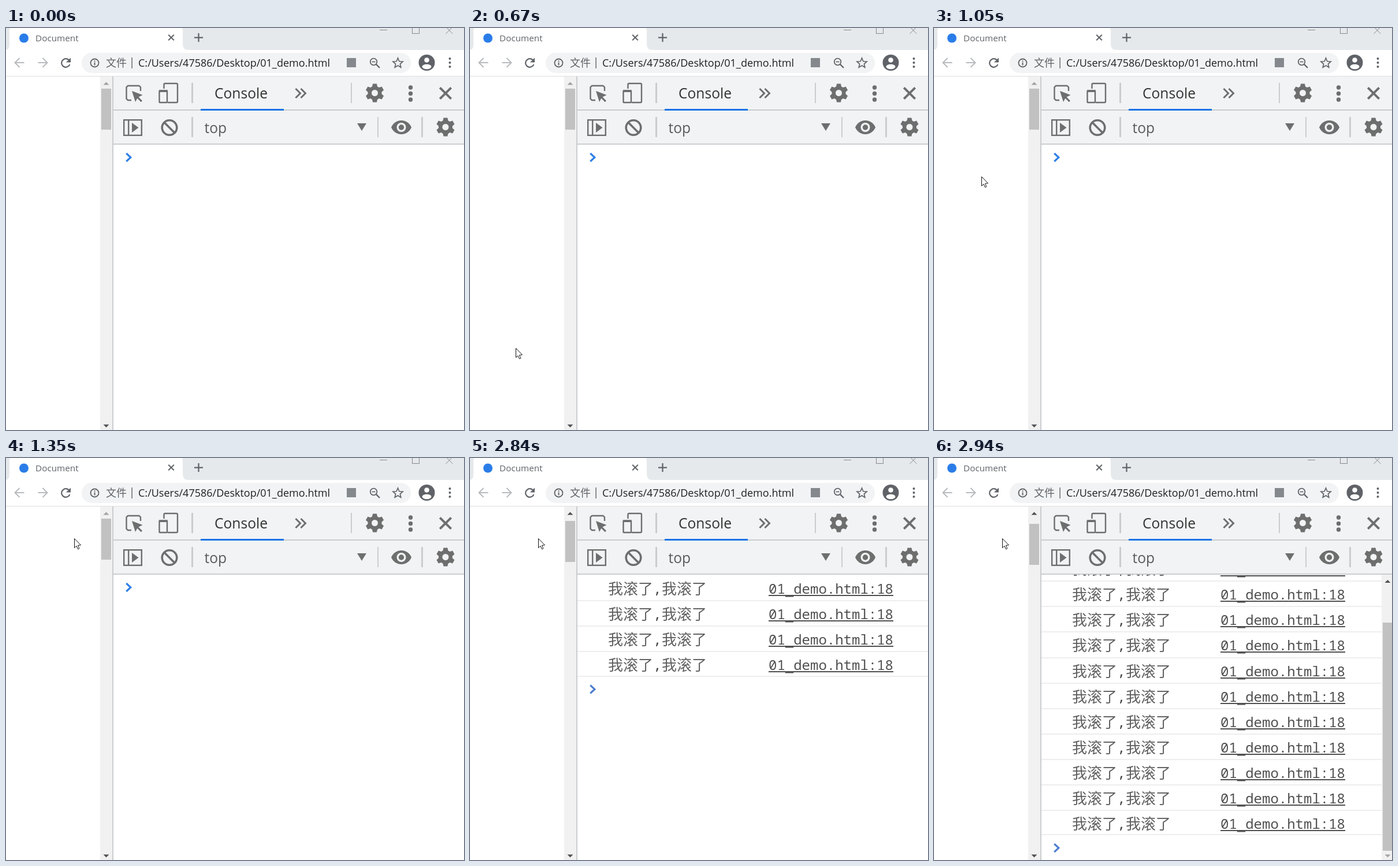
Write an HTML page with a canvas that moves like this. It is 793 px wide and 696 px high and loops after 7550 ms.

```html
<!DOCTYPE html>
<html lang="zh">
<head>
<meta charset="utf-8">
<title>Document</title>
<style>
html, body { margin: 0; width: 100%; height: 100%; overflow: hidden; background: #fff; }
canvas { display: block; }
</style>
</head>
<body>
<canvas id="stage" width="793" height="696"></canvas>
<script>
const ctx = document.getElementById('stage').getContext('2d');
const LOOP = 7550;
const UI = '"Open Sans", "Noto Sans", sans-serif';
const CJK = '"Noto Sans CJK SC", "Noto Sans CJK", sans-serif';
const MONO = '"Noto Sans Mono", "DejaVu Sans Mono", monospace';
const GREY = '#5f6368', ICON = '#6e6e6e', LINE = '#cacdd1', BAR = '#f1f3f4';
const ROW = 44.1, CHAR = 14.4;

// Pointer tip: time, x, y
const PATH = [
  [450, 192, 684], [560, 118, 620], [675, 79, 554], [800, 75, 445],
  [950, 76, 325], [1050, 82, 257], [1200, 105, 180], [1350, 118, 139]
];

function rect(x, y, w, h, color) {
  ctx.fillStyle = color;
  ctx.fillRect(x, y, w, h);
}

function circle(x, y, r, color) {
  ctx.fillStyle = color;
  ctx.beginPath();
  ctx.arc(x, y, r, 0, Math.PI * 2);
  ctx.fill();
}

function ring(x, y, r, color, width) {
  ctx.strokeStyle = color;
  ctx.lineWidth = width;
  ctx.beginPath();
  ctx.arc(x, y, r, 0, Math.PI * 2);
  ctx.stroke();
}

function trace(points, close) {
  ctx.beginPath();
  points.forEach(([x, y]) => ctx.lineTo(x, y));
  if (close) ctx.closePath();
}

function line(points, color, width, close) {
  trace(points, close);
  ctx.strokeStyle = color;
  ctx.lineWidth = width;
  ctx.stroke();
}

function poly(points, color) {
  trace(points, true);
  ctx.fillStyle = color;
  ctx.fill();
}

function box(x, y, w, h, r, color, width) {
  ctx.beginPath();
  ctx.roundRect(x, y, w, h, r);
  if (width) {
    ctx.strokeStyle = color;
    ctx.lineWidth = width;
    ctx.stroke();
  } else {
    ctx.fillStyle = color;
    ctx.fill();
  }
}

function text(str, x, y, font, color) {
  ctx.font = font;
  ctx.fillStyle = color;
  ctx.fillText(str, x, y);
}

function cross(x, y, r, color, width) {
  line([[x - r, y - r], [x + r, y + r]], color, width);
  line([[x + r, y - r], [x - r, y + r]], color, width);
}

function dots(x, y, gap, r, color) {
  for (let i = -1; i <= 1; i++) circle(x, y + i * gap, r, color);
}

function triangle(x, y, half, height, color) {
  poly([[x - half, y - height / 2], [x + half, y - height / 2], [x, y + height / 2]], color);
}

function chevron(x, y, w, h, color, width) {
  line([[x, y - h], [x + w, y], [x, y + h]], color, width);
}

function gear(x, y) {
  ctx.save();
  ctx.translate(x, y);
  for (let i = 0; i < 6; i++) {
    poly([[-5, -9], [-3.4, -16], [3.4, -16], [5, -9]], ICON);
    ctx.rotate(Math.PI / 3);
  }
  ctx.restore();
  circle(x, y, 12, ICON);
  circle(x, y, 5.5, BAR);
}

function star(x, y, r) {
  const points = Array.from({ length: 10 }, (_, i) => {
    const a = i * Math.PI / 5 - Math.PI / 2, d = i % 2 ? r * 0.45 : r;
    return [x + d * Math.cos(a), y + d * Math.sin(a)];
  });
  line(points, GREY, 1.7, true);
}

function arrow(x, y, dir) {
  line([[x - 8 * dir, y], [x + 8 * dir, y]], '#b8babd', 2);
  line([[x, y - 8], [x + 8 * dir, y], [x, y + 8]], '#b8babd', 2);
}

function tabStrip() {
  rect(0, 0, 793, 38, '#e6e9ec');
  ctx.fillStyle = '#fff';
  ctx.beginPath();
  ctx.moveTo(0, 38);
  ctx.quadraticCurveTo(6, 37, 6, 29);
  ctx.lineTo(6, 4);
  ctx.quadraticCurveTo(6, 1, 8, 0);
  ctx.lineTo(304, 0);
  ctx.quadraticCurveTo(306, 1, 306, 4);
  ctx.lineTo(306, 28);
  ctx.quadraticCurveTo(306, 38, 316, 38);
  ctx.fill();
  circle(31, 17.5, 8, '#2a7de8');
  text('Document', 51, 23, '15.3px ' + UI, GREY);
  cross(286, 16.5, 4.8, GREY, 2);
  rect(326, 15.5, 15, 2.2, GREY);
  rect(332.4, 9, 2.2, 15, GREY);
  rect(647, 3, 13, 1, '#888');
  ctx.strokeStyle = '#888';
  ctx.lineWidth = 1;
  ctx.strokeRect(703.5, -2.5, 12, 12);
  cross(767.5, 4, 6, '#888', 1);
}

function addressBar() {
  arrow(23.5, 60, -1);
  arrow(63.5, 60, 1);
  ctx.strokeStyle = GREY;
  ctx.lineWidth = 2.2;
  ctx.beginPath();
  ctx.arc(103.5, 60.5, 7.3, 0.35, Math.PI * 1.75);
  ctx.stroke();
  poly([[112, 51.5], [112, 59.5], [104, 59.5]], GREY);

  box(131, 43, 570, 35, 17.5, BAR);
  ring(153.5, 60.5, 7, GREY, 1.8);
  rect(152.6, 59.5, 1.9, 5, GREY);
  rect(152.6, 56.3, 1.9, 1.9, GREY);
  text('文件', 173, 67, '18px ' + CJK, GREY);
  rect(217.4, 51, 1.4, 19, GREY);
  text('C:/Users/47586/Desktop/01_demo.html', 229, 67, '18px ' + UI, '#202124');

  rect(590, 52, 16, 16, '#85898d');
  ring(636.5, 58.5, 5.8, GREY, 1.8);
  line([[640.6, 62.6], [647, 69]], GREY, 2.2);
  rect(633.5, 57.7, 6, 1.6, GREY);
  star(678.5, 61, 9);
  circle(728.5, 60, 14, GREY);
  circle(728.5, 55.5, 4.3, '#fff');
  ctx.beginPath();
  ctx.ellipse(728.5, 67, 8, 4.2, 0, 0, Math.PI * 2);
  ctx.fill();
  dots(768.5, 60, 7, 2, GREY);
  rect(0, 83, 793, 1, '#dcdee1');
}

function inspectIcon() {
  line([[217, 125], [211, 125], [208.5, 122.5], [208.5, 102.5], [211, 100],
    [230.5, 100], [233, 102.5], [233, 109]], ICON, 2.4);
  poly([[218, 109], [236.5, 116], [229.5, 119.5], [236, 126], [233.8, 128.2],
    [227.3, 121.8], [224, 128]], ICON);
}

function eyeIcon(x, y) {
  ctx.fillStyle = ICON;
  ctx.beginPath();
  ctx.moveTo(x - 17.5, y);
  ctx.bezierCurveTo(x - 11, y - 16, x + 11, y - 16, x + 17.5, y);
  ctx.bezierCurveTo(x + 11, y + 16, x - 11, y + 16, x - 17.5, y);
  ctx.fill();
  circle(x, y, 8, BAR);
  circle(x, y, 4.7, ICON);
}

function devTools() {
  rect(184, 84, 2, 612, LINE);
  rect(186, 84, 607, 117, BAR);
  rect(186, 141, 607, 2, LINE);
  rect(186, 200, 607, 2, LINE);
  rect(337, 140, 144, 3, '#1a73e8');

  inspectIcon();
  box(273.5, 96, 23.5, 33, 2, ICON, 2.4);
  rect(263, 105, 17, 26, BAR);
  box(265.5, 108.5, 13.5, 20.5, 1, ICON, 2.4);
  rect(265, 107.5, 15, 3.5, ICON);
  text('Console', 361, 122, '24.6px ' + UI, '#333');
  chevron(501.5, 113, 8, 8, ICON, 3);
  chevron(510.5, 113, 8, 8, ICON, 3);
  gear(638.5, 112.5);
  dots(700.5, 113.5, 10.5, 3.7, ICON);
  cross(761, 113, 9.7, ICON, 4);

  ctx.strokeStyle = ICON;
  ctx.lineWidth = 2.4;
  ctx.strokeRect(204.2, 159.2, 30.6, 26.6);
  rect(211, 159, 2.4, 27, ICON);
  poly([[218, 164], [229.5, 172.5], [218, 181]], ICON);
  ring(283, 172.5, 12.8, ICON, 3.6);
  line([[274, 163.5], [292, 181.5]], ICON, 3.6);
  text('top', 343.5, 182, '24.6px ' + UI, '#5a5a5a');
  triangle(616, 171.5, 8, 13, ICON);
  eyeIcon(684.5, 172);
  gear(761, 171.5);

  rect(321, 95, 3, 35, '#cccccc');
  rect(597, 95, 2, 35, '#cccccc');
  rect(321, 154, 3, 35, '#cccccc');
  rect(643, 154, 2, 35, '#cccccc');
  rect(719, 154, 3, 35, '#cccccc');
}

function pageScroll(active, offset) {
  rect(163, 84, 21, 612, '#f1f1f1');
  rect(165, 105 + offset, 17, 71, '#c1c1c1');
  triangle(173.5, 96, 5, -5, active ? '#505050' : '#a3a3a3');
  triangle(173.5, 689, 5, 5, '#505050');
}

function message(x, y) {
  const han = '300 26px ' + CJK, color = '#606060';
  text('我滚了', x, y + 9, han, color);
  text(',', x + 78, y + 8, '24px ' + MONO, '#404040');
  text('我滚了', x + 93, y + 9, han, color);
}

function sourceLink(x, y) {
  const color = '#505050';
  text('01_demo.html:18', x, y + 8, '24px ' + MONO, color);
  rect(x, y + 10, 15 * CHAR, 2, color);
  // Keep the underscore visible below the underline.
  rect(x + 2 * CHAR, y + 12, CHAR, 1.5, color);
}

function consoleRows(count, scrolled) {
  const shift = scrolled ? 78.1 : 0;
  ctx.save();
  ctx.beginPath();
  ctx.rect(186, 202, 607, 494);
  ctx.clip();
  for (let i = 0; i < count; i++) {
    const top = i * ROW - shift;
    const y = Math.round(227.1 + top);
    message(239, y);
    sourceLink(scrolled ? 496 : 517, y);
    const last = i === count - 1;
    rect(186, Math.round(246.2 + top) - (last ? 2 : 0), 607, 2, '#eeeeee');
  }
  chevron(208.3, 224 + count * ROW - shift, 7.5, 7, count ? '#4a7cce' : '#2f80e8', 3.2);
  if (scrolled) {
    rect(775, 202, 18, 494, '#f1f1f1');
    rect(777, 285, 16, 395, '#c1c1c1');
    triangle(785.5, 213.5, 5, -5, '#505050');
    triangle(785.5, 689, 5, 5, '#a3a3a3');
  }
  ctx.restore();
}

function pointer(t) {
  if (t < 450) return;
  // The pointer is sampled every 25 ms.
  const time = Math.min(1350, 450 + 25 * Math.floor((t - 445) / 25));
  let i = 0;
  while (i < PATH.length - 2 && time > PATH[i + 1][0]) i++;
  const [t0, x0, y0] = PATH[i], [t1, x1, y1] = PATH[i + 1];
  const p = (time - t0) / (t1 - t0);
  ctx.save();
  ctx.translate(Math.round(x0 + (x1 - x0) * p) + 0.5, Math.round(y0 + (y1 - y0) * p) + 0.5);
  const shape = [[0, 0], [0, 16], [3.5, 12.8], [6, 18.3], [8.4, 17.3], [6, 11.8], [11, 11.3]];
  poly(shape, '#fff');
  line(shape, '#111', 1, true);
  ctx.restore();
}

function rowCount(t) {
  if (t < 2780) return 0;
  if (t >= 2940) return 12;
  const step = Math.floor((t - 2780) / 22);
  return Math.min(9, 2 + Math.floor(step * 1.4));
}

function draw(t) {
  const rows = rowCount(t);
  rect(0, 0, 793, 696, '#fff');
  tabStrip();
  addressBar();
  pageScroll(t >= 2740, Math.min(9, rows));
  devTools();
  consoleRows(rows, t >= 2940);
  pointer(t);
}

const start = performance.now();
function tick() {
  draw((performance.now() - start) % LOOP);
  requestAnimationFrame(tick);
}
tick();
</script>
</body>
</html>
```
